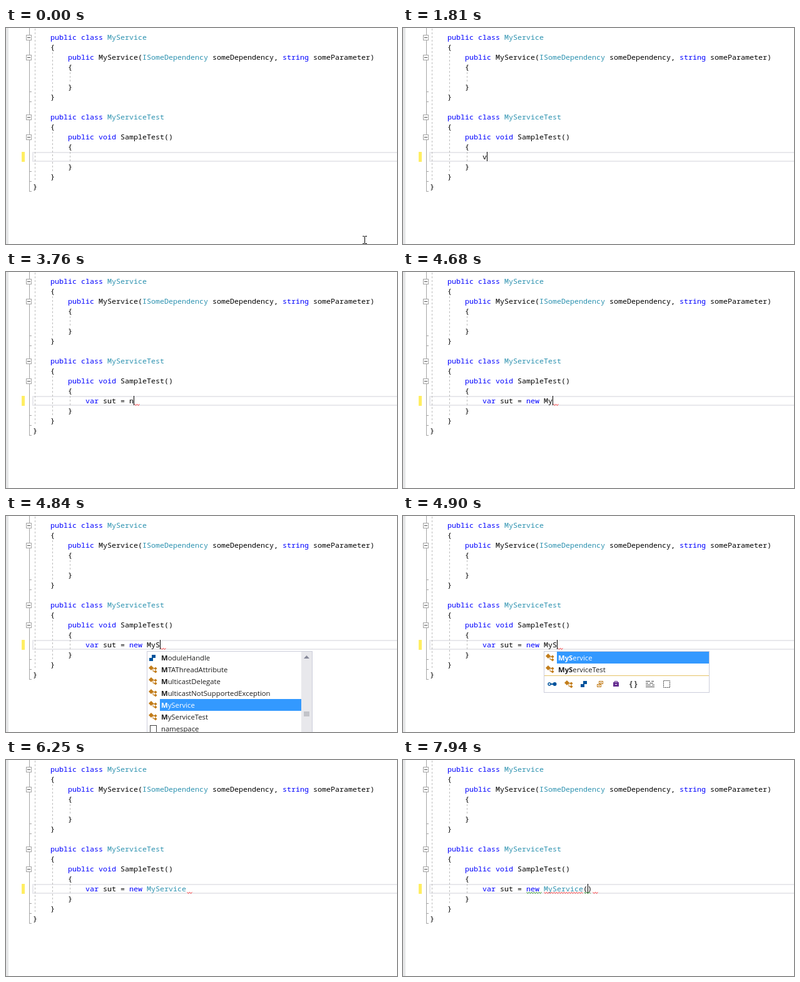
An HTML page with a canvas for the animation above (8 s loop, 625 px wide and 347 px high).

```html
<!DOCTYPE html>
<html lang="en">
<head>
<meta charset="utf-8">
<title>Typing in a code editor</title>
<style>
html, body { margin: 0; width: 100%; height: 100%; overflow: hidden; background: #fff; }
canvas { display: block; }
</style>
</head>
<body>
<canvas id="stage" width="625" height="347"></canvas>
<script>
const ctx = document.getElementById('stage').getContext('2d');
const LOOP = 8000, COL = 7, ROW = 16, LEFT = 43, INDENT = 127;
const CODE = '11.667px "Noto Sans Mono", "DejaVu Sans Mono", monospace';
const UI = '11.3px "Open Sans", "Noto Sans", sans-serif';
const BLUE = '#0000ff', TEAL = '#2b91af', INK = '#000', RED = '#ff2020', GREEN = '#108a10';
const ORANGE = '#c27d1a', NAVY = '#00539c', DARK = '#424242';

// [row, column, text, colour, text, colour, ...]
const code = [
  [0, 4, 'public class ', BLUE, 'MyService', TEAL],
  [1, 4, '{', INK],
  [2, 8, 'public ', BLUE, 'MyService(', INK, 'ISomeDependency', TEAL,
    ' someDependency, ', INK, 'string', BLUE, ' someParameter)', INK],
  [3, 8, '{', INK],
  [5, 8, '}', INK],
  [6, 4, '}', INK],
  [8, 4, 'public class ', BLUE, 'MyServiceTest', TEAL],
  [9, 4, '{', INK],
  [10, 8, 'public void', BLUE, ' SampleTest()', INK],
  [11, 8, '{', INK],
  [13, 8, '}', INK],
  [14, 4, '}', INK],
  [15, 0, '}', INK]
];

const typed = 'var sut = new MyService()';
const keyTimes = [1810, 2420, 2560, 2640, 2870, 2940, 3010, 3170, 3250, 3390, 3760, 4070, 4150,
  4220, 4300, 4680, 4840, 5140, 5200, 5360, 5500, 5580, 5720, 7940, 7940];
const matchTimes = [4840, 4900, 4900, 5140, 5200, 5360, 5500, 5640, 5800];
const longList = ['ModuleHandle', 'MTAThreadAttribute', 'MulticastDelegate',
  'MulticastNotSupportedException', 'MyService', 'MyServiceTest', 'namespace'];
const shortList = ['MyService', 'MyServiceTest'];

const countUpTo = (times, t) => times.filter(x => x <= t).length;
const within = (t, a, b) => t >= a && t < b;

function box(x, y, w, h, color) {
  ctx.fillStyle = color;
  ctx.fillRect(x, y, w, h);
}

function frame(x, y, w, h, color) {
  ctx.strokeStyle = color;
  ctx.lineWidth = 1;
  ctx.strokeRect(x + 0.5, y + 0.5, w - 1, h - 1);
}

function path(points, color, width = 1) {
  ctx.beginPath();
  points.forEach(([x, y]) => ctx.lineTo(x, y));
  ctx.strokeStyle = color;
  ctx.lineWidth = width;
  ctx.stroke();
}

function shape(points, color) {
  ctx.beginPath();
  points.forEach(([x, y]) => ctx.lineTo(x, y));
  ctx.fillStyle = color;
  ctx.fill();
}

function write(text, x, y, color, font = CODE) {
  ctx.font = font;
  ctx.fillStyle = color;
  ctx.fillText(text, x, y);
  return x + ctx.measureText(text).width;
}

function squiggle(x0, x1, color) {
  const points = [];
  for (let x = x0; x <= x1; x += 2) points.push([x + 0.5, (x - x0) % 4 ? 214.3 : 212.4]);
  path(points, color);
}

function dashes(x, y0, y1) {
  for (let y = y0; y < y1; y += 6) box(x, y, 1, Math.min(3, y1 - y), '#bdbdbd');
}

function drawEditor() {
  box(0, 0, 625, 347, '#fff');
  box(0, 0, 4, 347, '#e6e7e8');
  box(25, 199, 5, 16, '#ffee62');

  box(42, 199, 583, 2, '#e8e8ec');
  box(42, 213, 583, 2, '#e8e8ec');
  box(42, 199, 2, 16, '#e8e8ec');

  dashes(46, 1, 247);
  dashes(74, 39, 103);
  dashes(74, 167, 231);
  dashes(102, 71, 88);
  dashes(102, 199, 216);

  box(37, 0, 1, 263, '#a5a5a5');
  [102, 118, 230, 246, 262].forEach(y => box(37, y, 4, 1, '#a5a5a5'));
  [0, 2, 8, 10].forEach(row => {
    const y = 11 + row * ROW;
    box(32, y, 9, 9, '#fff');
    frame(32, y, 9, 9, '#a5a5a5');
    box(34, y + 4, 5, 1, '#555');
  });

  for (const [row, col, ...runs] of code) {
    let x = LEFT + col * COL;
    for (let i = 0; i < runs.length; i += 2) {
      write(runs[i], x, 19 + row * ROW, runs[i + 1]);
      x += runs[i].length * COL;
    }
  }
}

function drawLine(t, n) {
  const parts = [
    [0, 3, t >= 2640 ? BLUE : INK],
    [3, 10, INK],
    [10, 13, t >= 4150 ? BLUE : INK],
    [14, 23, t >= 6090 ? TEAL : INK],
    [23, 25, INK]
  ];
  for (const [a, b, color] of parts) {
    if (n > a) write(typed.slice(a, Math.min(b, n)), INDENT + a * COL, 211, color);
  }
  const end = INDENT + n * COL;
  if (t >= 3530) squiggle(end + 1, end + 9, RED);
  if (t >= 6860) {
    squiggle(197, t < 7170 ? 286 : 222, GREEN);
    if (t >= 7170) squiggle(225, 287, RED);
  }
  if (t >= 7940) squiggle(289, 299, GREEN);

  const hidden = t < 340 || within(t, 880, 1420) || within(t, 6250, 6330) || within(t, 7400, 7940);
  if (!hidden) box(INDENT + Math.min(n, 24) * COL, 199, 1, 15, INK);
}

function drawBulb() {
  ctx.beginPath();
  ctx.arc(14.5, 204.5, 4.5, 0, Math.PI * 2);
  ctx.fillStyle = '#fccb3a';
  ctx.fill();
  box(12, 208, 5, 2, '#fccb3a');
  box(12, 211, 5, 1, DARK);
  box(13, 213, 3, 1, DARK);
}

function classIcon(x, y) {
  const diamond = (cx, cy, r) => shape([[cx - r, cy], [cx, cy - r], [cx + r, cy], [cx, cy + r]], ORANGE);
  diamond(x - 3, y - 2, 4);
  diamond(x + 4, y - 1, 2.6);
  diamond(x + 4, y + 4, 2.6);
  path([[x, y - 1.5], [x + 3, y - 1.5]], ORANGE);
  path([[x, y - 1.5], [x, y + 3.5], [x + 3, y + 3.5]], ORANGE);
}

function structIcon(x, y) {
  box(x - 1, y - 5, 6, 5, NAVY);
  box(x - 5, y, 6, 5, NAVY);
}

function drawToolbar(y) {
  ctx.beginPath();
  ctx.arc(234, y, 2, 0, 7);
  ctx.strokeStyle = NAVY;
  ctx.lineWidth = 1.4;
  ctx.stroke();
  box(236, y - 1, 4, 2, NAVY);
  ctx.beginPath();
  ctx.arc(242.5, y, 3, 0, 7);
  ctx.fillStyle = NAVY;
  ctx.fill();

  classIcon(265, y);
  structIcon(289, y);

  frame(313, y - 5, 7, 5, ORANGE);
  frame(310, y, 7, 5, ORANGE);
  box(315, y - 3, 3, 1, ORANGE);
  box(312, y + 2, 3, 1, ORANGE);

  box(336, y - 3, 9, 7, '#652d90');
  frame(338, y - 5, 5, 3, '#652d90');
  box(339, y, 3, 1, '#fff');

  write('{ }', 362, y + 4, DARK, 'bold 12px "Open Sans", sans-serif');

  [[388, -5, 7], [397, -5, 4], [388, -2, 4], [394, -2, 6],
   [388, 1, 8], [398, 1, 4], [388, 4, 14]].forEach(([x, dy, w]) => box(x, y + dy, w, 1, DARK));

  ctx.setLineDash([2, 1]);
  frame(416, y - 6, 11, 12, DARK);
  ctx.setLineDash([]);
}

function drawItem(text, row, selected, match, right) {
  const top = 218 + row * 19;
  if (selected) box(246, top, right - 246, 19, '#3399ff');
  const color = selected ? '#fff' : '#1e1e1e';
  if (text === 'ModuleHandle') structIcon(234, top + 10);
  else if (text === 'namespace') frame(230, top + 4, 11, 12, DARK);
  else classIcon(235, top + 9);
  const bold = text[0] === 'M' ? match : 0;
  const x = write(text.slice(0, bold), 248, top + 14, color, 'bold ' + UI);
  write(text.slice(bold), x, top + 14, color, UI);
}

function drawPopup(t) {
  const full = t < 4900;
  const match = countUpTo(matchTimes, t);
  const height = full ? 140 : 67;
  box(225, 217, 265, height, '#fff');
  const right = full ? 472 : 489;
  (full ? longList : shortList).forEach((text, row) =>
    drawItem(text, row, text === 'MyService', match, right));
  if (full) {
    box(472, 218, 17, 138, '#e8e8ec');
    shape([[476, 229], [480.5, 224], [485, 229]], '#868999');
    box(476, 314, 9, 8, '#c2c3c9');
  } else {
    box(226, 256, 263, 1, '#e5c365');
    drawToolbar(270);
  }
  frame(225, 217, 265, height, '#cccedb');
}

function drawPointer() {
  path([[570, 334.5], [573, 334.5]], INK);
  path([[574, 334.5], [577, 334.5]], INK);
  path([[573.5, 335], [573.5, 346]], INK);
  path([[570, 346.5], [573, 346.5]], INK);
  path([[574, 346.5], [577, 346.5]], INK);
}

function draw(now) {
  const t = now % LOOP;
  drawEditor();
  if (within(t, 2340, 2420) || within(t, 6860, 7940)) drawBulb();
  drawLine(t, countUpTo(keyTimes, t));
  if (within(t, 4840, 6250)) drawPopup(t);
  if (t < 60) drawPointer();
}

let start;
function tick(now) {
  if (start === undefined) start = now;
  draw(Math.max(0, now - start));
  requestAnimationFrame(tick);
}
draw(0);
requestAnimationFrame(tick);
</script>
</body>
</html>
```
